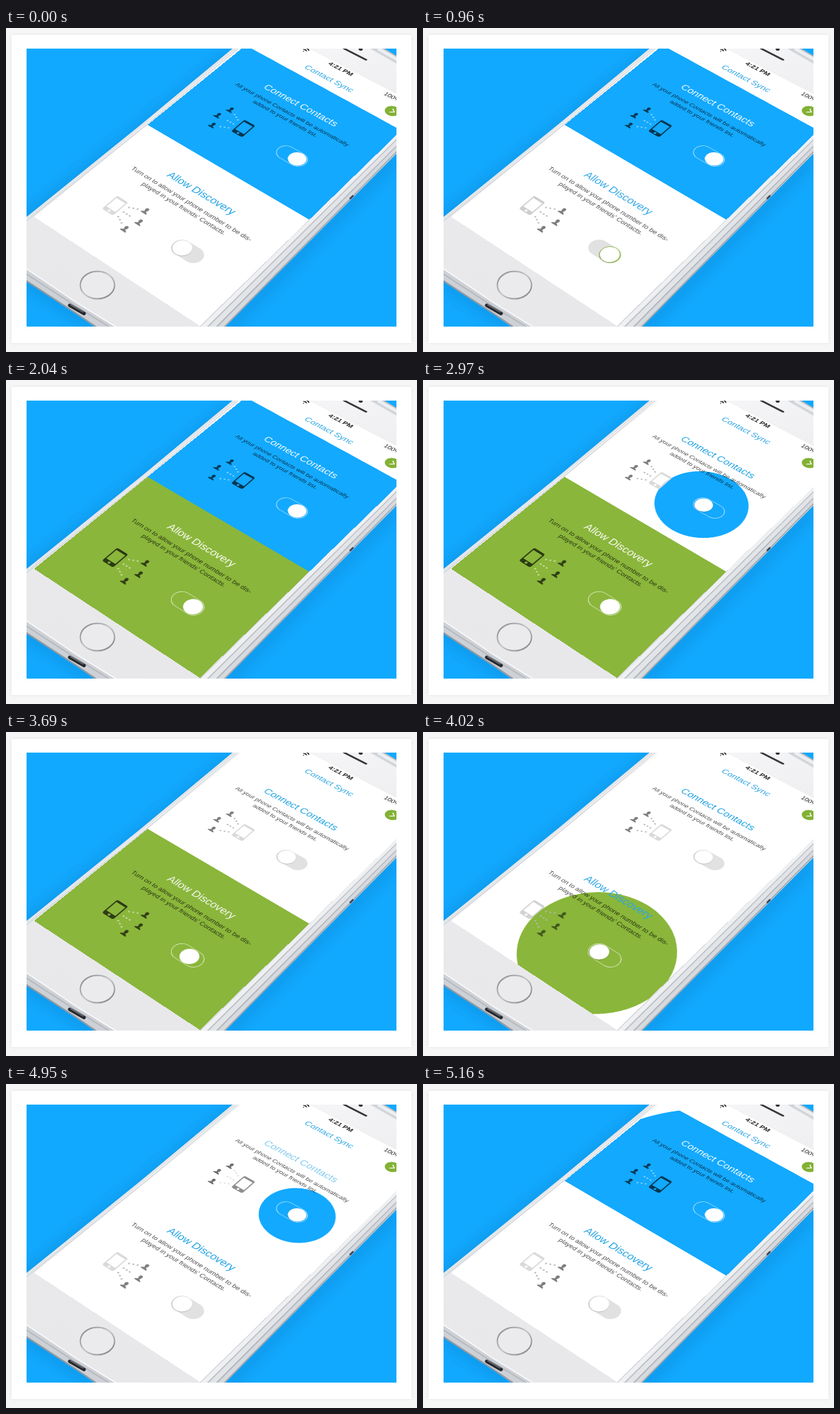
An HTML page that plays this animation: 600 px wide and 472 px high, repeating every 5190 ms.

```html
<!DOCTYPE html>
<html lang="en">
<head>
<meta charset="utf-8">
<title>Contact Sync</title>
<style>
  html, body { margin: 0; width: 100%; height: 100%; overflow: hidden; background: #f6f6f6; }
  #card { position: absolute; left: 8px; top: 10px; width: 584px; height: 449px; background: #fff; box-shadow: 0 0 4px rgba(0,0,0,.09); }
  #pic { position: absolute; left: 30px; top: 30px; width: 540px; height: 404.5px; overflow: hidden; contain: strict; }
  #pic svg { position: absolute; left: -30px; top: -30px; overflow: visible; }
  /* lays the flat 375 x 667 screen onto the tilted phone */
  #screen {
    transform-origin: 0 0;
    transform: matrix3d(.55219,.31971,0,-.00017376, -.56315,.38561,0,-.000226, 0,0,1,0, 413.83,-.939,0,1.0826);
  }
  text { font-family: "Liberation Sans", Arial, sans-serif; }
</style>
</head>
<body>
<div id="card"></div>
<div id="pic">
  <svg id="body" width="600" height="472" viewBox="0 0 600 472">
    <defs>
      <filter id="soft" x="-20%" y="-20%" width="140%" height="140%"><feGaussianBlur stdDeviation="9"/></filter>
      <linearGradient id="face" x1="0" y1="0" x2=".3" y2="1">
        <stop offset="0" stop-color="#fbfbfc"/><stop offset=".6" stop-color="#e9e9ec"/><stop offset="1" stop-color="#e8e8eb"/>
      </linearGradient>
      <linearGradient id="ring" x1="0" y1="0" x2="1" y2="1">
        <stop offset="0" stop-color="#808286"/><stop offset=".5" stop-color="#c4c6c9"/><stop offset="1" stop-color="#77797d"/>
      </linearGradient>
    </defs>
    <rect width="600" height="472" fill="#11a9ff"/>
    <path d="M10 291L198 144 332 34M322 440L570 190M20 366L130 438" fill="none" stroke="#04508c" stroke-opacity=".2" stroke-width="14" filter="url(#soft)"/>
    <path d="M20 284L198 140 332 29H551L580 47V173L320 435H129L103 417 20 363Z" fill="#cdd0d5"/>
    <path d="M20 287L200 142 337 29H532L590 62V135L283 435H160L103 399 20 343Z" fill="url(#face)"/>
    <path d="M20 285L199 141 334 29" fill="none" stroke="#e6e8eb" stroke-width="2.500"/>
    <path d="M24 286L204 142 340 29" fill="none" stroke="#c3c7cc" stroke-width="1"/>
    <path d="M20 344L103 400 160 435" fill="none" stroke="#f8f8f9" stroke-width="2"/>
    <path d="M20 352L103 406 150 435" fill="none" stroke="#b3b7bd" stroke-width="1.500"/>
    <path d="M20 362L103 416 131 435" fill="none" stroke="#8e959d" stroke-width="2"/>
    <path d="M93 404L114 416" stroke="#24272b" stroke-width="5" stroke-linecap="round"/>
    <path d="M94 403L113 414" stroke="#6b6f75" stroke-width="1.500"/>
    <path d="M533 30L575 54" stroke="#d5d8dc" stroke-width="1.500"/>
    <path d="M543 30L575 48" stroke="#eceef0" stroke-width="5"/>
    <path d="M551 30L575 44" stroke="#aeb4bb" stroke-width="1.500"/>
    <g id="side"></g>
    <path d="M502 249L507 244" stroke="#3b4450" stroke-width="2.500"/>
    <ellipse cx="133.500" cy="374.500" rx="25" ry="20" fill="#ebebed" stroke="url(#ring)" stroke-width="2"/>
  </svg>
  <svg id="screen" width="375" height="667" viewBox="0 0 375 667"></svg>
</div>
<script>
const NS = 'http://www.w3.org/2000/svg';
const LOOP = 5190, STEP = 30;
const SLIDE = 180, LAG = 60, SPREAD = 440, REACH = 340;
const AXIS = 257.5, ROW = 262, THROW = 12;
const screen = document.getElementById('screen');

function add(parent, tag, attrs, text) {
  const el = document.createElementNS(NS, tag);
  for (const key in attrs) el.setAttribute(key, attrs[key]);
  if (text) el.textContent = text;
  parent.appendChild(el);
  return el;
}
const label = (parent, text, x, y, size, more) =>
  add(parent, 'text', { x, y, 'font-size': size, 'text-anchor': 'middle', ...more }, text);

const clamp = x => Math.max(0, Math.min(1, x));
const ease = x => x * x * (3 - 2 * x);
const mix = (a, b, k) => `rgba(${a.map((v, i) => {
  const m = v + (b[i] - v) * k;
  return i < 3 ? Math.round(m) : m.toFixed(3);
})})`;

// Metal strips along the right side, measured outwards from the screen
function strip(from, to, fill) {
  const edge = k => [`${283 + 1.25 * k},435`, `${590 + .85 * k},135`];
  const [a, b] = edge(from), [c, d] = edge(to);
  add(document.getElementById('side'), 'polygon', { points: [a, b, d, c].join(' '), fill });
}
strip(0, 1, '#cfd2d6');
strip(1, 8.5, '#eef0f2');
strip(8.5, 10.5, '#bbbfc5');
strip(10.5, 19, '#e2e4e8');
strip(19, 21, '#adb2b9');
strip(21, 28, '#d6d9dd');
strip(28, 30, '#9aa3ac');

// Header
add(screen, 'rect', { width: 375, height: 667, fill: '#fff' });
add(screen, 'path', { d: 'M157-45H210', stroke: '#33363a', 'stroke-width': 5, 'stroke-linecap': 'round' });
add(screen, 'circle', { cx: 184, cy: -64, r: 4, fill: '#33363a' });
add(screen, 'path', { d: 'M93 5Q100-1 107 5M96 9Q100 5 104 9M99 13H101', fill: 'none', stroke: '#222', 'stroke-width': 2.6 });
label(screen, '4:21 PM', 187.5, 14, 14.8, { 'font-weight': 'bold', fill: '#222' });
label(screen, '100%', 293, 17, 14, { 'text-anchor': 'start', fill: '#222' });
label(screen, 'Contact Sync', 186, 53, 19, { fill: '#2ba6e4' });
add(screen, 'circle', { cx: 332.5, cy: 45, r: 14, fill: '#83b135' });
add(screen, 'path', { d: 'M330 39L337 45 330 51', fill: 'none', stroke: '#fff', 'stroke-width': 2.2 });

const HANDSET = 'M-9-20H9Q13-20 13-16V16Q13 20 9 20H-9Q-13 20-13 16V-16Q-13-20-9-20Z' +
  'M-10.5-15V11H10.5V-15ZM-2.5 15.500A2.5 2.5 0 0 0 2.5 15.500A2.5 2.5 0 0 0-2.5 15.500Z';
const PERSON = 'M0-8C5-8 4.500-1 2 1.500C2 4 7.500 3.500 7.500 8H-7.500C-7.500 3.500-2 4-2 1.500C-4.500-1-5-8 0-8Z';

function makePanel(o) {
  const defs = add(screen, 'defs', {});
  const [left, right] = o.top;
  const area = { points: `0,${left} 375,${right} 375,${o.bottom} 0,${o.bottom}` };
  add(add(defs, 'clipPath', { id: o.id + 'Box' }), 'polygon', area);
  const ripple = add(add(defs, 'clipPath', { id: o.id + 'Ripple' }), 'circle', { cy: ROW + o.shift });

  const pill = { x: AXIS - 31, y: ROW + o.shift - 18, width: 62, height: 36, rx: 18 };
  add(screen, 'rect', { ...pill, fill: '#e1e1e2' });
  const frame = add(screen, 'g', { 'clip-path': `url(#${o.id}Box)` });
  const lit = add(frame, 'g', { 'clip-path': `url(#${o.id}Ripple)` });
  add(lit, 'polygon', { ...area, fill: o.color });
  add(lit, 'rect', { ...pill, fill: 'none', stroke: '#fff', 'stroke-opacity': .7, 'stroke-width': 1.2 });

  const g = add(screen, 'g', { transform: `translate(0 ${o.shift})` });
  const title = label(g, o.title, 188.5, 150.5, 21.4);
  label(g, o.lines[0], 189, 178, 13.4, { fill: '#000', 'fill-opacity': .7 });
  label(g, o.lines[1], 187.5, 195.5, 13.4, { fill: '#000', 'fill-opacity': .7 });

  const place = u => o.mirror ? 235 - u : u;
  const phone = add(g, 'path', { d: HANDSET, 'fill-rule': 'evenodd', transform: `translate(${place(91)} 262)` });
  const people = add(g, 'g', {}), dots = add(g, 'g', {});
  for (const row of [-1, 0, 1]) {
    add(people, 'path', { d: PERSON, transform: `translate(${place(row ? 141 : 150)} ${264 + 27 * row}) scale(.88)` });
    for (let i = 0; i < 3; i++)
      add(dots, 'circle', { cx: place(113 + 7 * i), cy: 264 + row * (14 + 3.5 * i), r: 1.8 });
  }
  const shade = add(g, 'circle', { cy: ROW + 1, r: 18, fill: '#000' });
  const knob = add(g, 'circle', { cy: ROW, r: 17, fill: '#fff' });

  return t => {
    const rising = o.onLast ? t >= o.on : t < o.off;
    const start = rising ? o.on : o.off;
    const slide = ease(clamp((t - start) / SLIDE));
    const p = clamp((t - start - LAG) / SPREAD);
    const pos = rising ? slide : 1 - slide;
    const x = AXIS + THROW * (2 * pos - 1);
    const k = rising ? clamp((p - .2) / .6) : 1 - clamp(p / .8);

    knob.setAttribute('cx', x);
    shade.setAttribute('cx', x);
    shade.setAttribute('fill-opacity', .13 * (1 - k));
    // the spreading disc starts and ends under the knob
    ripple.setAttribute('cx', rising ? AXIS + THROW : AXIS + THROW - 29 * slide);
    ripple.setAttribute('r', REACH * (rising ? p * p : 1 - p * p));

    title.setAttribute('fill', mix([34, 163, 228, 1], [255, 255, 255, .95], k));
    phone.setAttribute('fill', mix([218, 218, 218, 1], [0, 0, 0, .68], k));
    people.setAttribute('fill', mix([0, 0, 0, .5], [0, 0, 0, .65], k));
    dots.setAttribute('fill', mix([180, 180, 180, 1], [255, 255, 255, .55], k));
  };
}

const panels = [
  makePanel({
    id: 'sync', top: [72, 78], bottom: 368, shift: 0, color: '#13a9fe', mirror: true,
    off: 2530, on: 4690, onLast: true, title: 'Connect Contacts',
    lines: ['All your phone Contacts will be automatically', 'added to your friends list.']
  }),
  makePanel({
    id: 'find', top: [368, 368], bottom: 667, shift: 296, color: '#8ab63b', mirror: false,
    on: 797, off: 3620, onLast: false, title: 'Allow Discovery',
    lines: ['Turn on to allow your phone number to be dis-', 'played in your friends’ Contacts.']
  })
];

const begin = performance.now();
function draw(now) {
  const t = Math.max(0, now - begin) % LOOP;
  const beat = Math.floor(t / STEP) * STEP;
  panels.forEach(show => show(beat));
  requestAnimationFrame(draw);
}
draw(begin);
</script>
</body>
</html>
```
